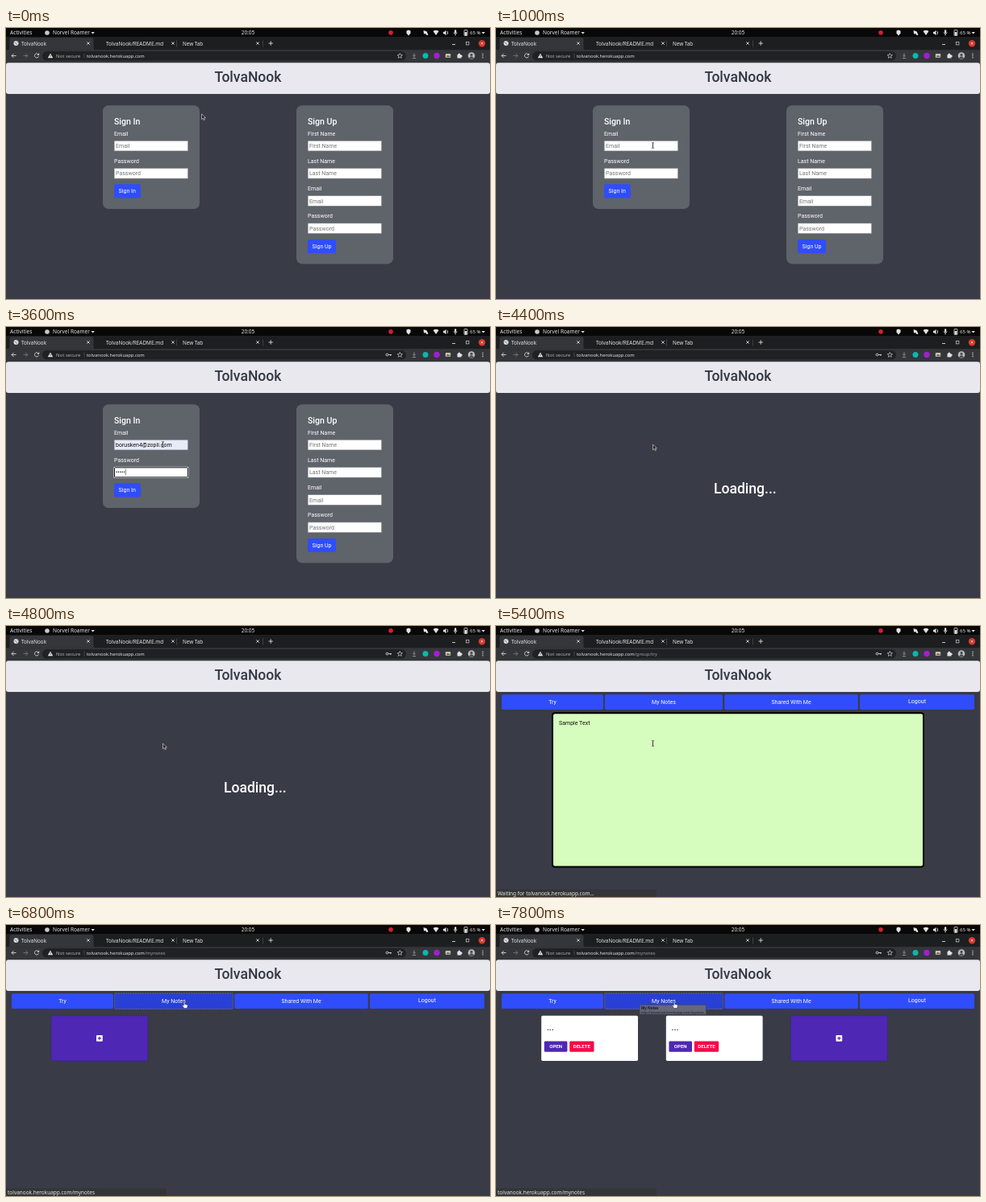
Recreate the animation shown at these times as an HTML page. Size 600 by 337 pixels, loop 8000 ms.

```html
<!DOCTYPE html>
<html lang="en">
<head>
<meta charset="utf-8">
<title>TolvaNook</title>
<style>
  html, body { margin: 0; width: 100%; height: 100%; overflow: hidden; background: #393b47; }
  svg { display: block; width: 100%; height: 100%; }
  text { font: 7.03px Roboto, sans-serif; fill: #fff; white-space: pre; }
  .ui { font-family: "Noto Sans", sans-serif; font-size: 6.3px; fill: #e4e4e4; }
  .title { font-size: 17.55px; font-weight: 500; }
  .line { fill: none; stroke: #d8d8d8; stroke-width: .9; }
</style>
</head>
<body>
<svg id="stage" viewBox="0 0 600 337">
  <g id="browser"></g>
  <g id="page"></g>
</svg>
<script>
const LOOP = 8000, STEP = 200;
const APP = 'TolvaNook', HOST = 'tolvanook.herokuapp.com';
const EMAILS = ['borusken4@zopli.com', 'borusken4@tarvilo.com'];
const BLUE = '#304dfc', PURPLE = '#4e27b5';

const rect = (x, y, w, h, fill, rx = 0, more = '') =>
  `<rect x="${x}" y="${y}" width="${w}" height="${h}" rx="${rx}" fill="${fill}" ${more}/>`;
const text = (x, y, s, style = '', cls = '') =>
  `<text x="${x}" y="${y}" class="${cls}" style="${style}">${s}</text>`;
const ui = (x, y, s, style = '') => text(x, y, s, style, 'ui');
const dot = (x, y, r, fill) => `<circle cx="${x}" cy="${y}" r="${r}" fill="${fill}"/>`;
const line = (d, style = '') => `<path class="line" d="${d}" style="${style}"/>`;
const shape = (d, fill = '#e4e4e4', more = '') => `<path d="${d}" fill="${fill}" ${more}/>`;
const cross = (x, y, r = 1.7) => line(`M${x - r} ${y - r}l${2 * r} ${2 * r}m0 ${-2 * r}l${-2 * r} ${2 * r}`);
const MIDDLE = 'text-anchor:middle;';

function desktopBar() {
  return rect(0, 0, 600, 11.5, '#080808')
    + ui(5, 8.2, 'Activities', 'font-size:6.6px')
    + dot(51, 6, 2.8, '#c8c8c8')
    + ui(58, 8.2, 'Norvel Roamer', 'font-size:6.5px')
    + shape('M105.5 5h4.4l-2.2 2.6z')
    + ui(300, 8.2, '20:05', MIDDLE + 'font-size:6.5px')
    + dot(477, 5.7, 2.8, '#d51f30')
    + shape('M496.500 3.500l2.500 -1 2.500 1v3l-2.500 3 -2.500 -3z')
    + shape('M517.500 3l4 1.200 2 4.300 -2 .5 -1.500 -2 -2 .5z')
    + shape('M529.500 4q3.500 -2.500 7 0l-3.500 5z')
    + shape('M542 4.700h1.500l2 -2v6.600l-2 -2h-1.500z') + line('M547 4q1.500 2 0 4')
    + rect(556, 2.2, 2.2, 4.5, '#e4e4e4', 1.1) + line('M555 5.500q2.100 4 4.200 0M557.100 7.500v2')
    + rect(568, 2.5, 4, 7, 'none', .6, 'stroke="#ddd" stroke-width=".8"') + rect(568.6, 5, 2.8, 4, '#ddd')
    + ui(575, 8.2, '65 %', 'font-size:6px')
    + shape('M589.500 5h4.400l-2.200 2.600z');
}

function tabStrip() {
  return rect(0, 11.5, 600, 16, '#1d1e20')
    + shape('M2 27.500q2.500 0 2.500 -3v-10q0 -2.500 2.500 -2.500h99q2.500 0 2.500 2.500v10q0 3 2.500 3z', '#35363a')
    + dot(12.5, 19, 3, '#e2e2e2') + line('M10.500 18l2 1 1 2M13 16.500l1.500 1.500', 'stroke:#55565a;stroke-width:.7')
    + ui(19, 21.5, APP)
    + ui(124, 21.5, APP + '/README.md', 'font-size:6.4px')
    + ui(219, 21.5, 'New Tab')
    + [102, 207, 312].map(x => cross(x, 19)).join('')
    + line('M211.500 15.500v8M318.500 15.500v8', 'stroke:#55565a;stroke-width:.6')
    + line('M325.500 19h5.400m-2.700 -2.700v5.400M553 20.500h4')
    + rect(570.3, 17.3, 3.6, 3.6, 'none', 0, 'stroke="#ccc" stroke-width=".7"')
    + dot(590, 19.2, 4.2, '#d9372b') + cross(590, 19.2, 1.3);
}

function toolbar() {
  return rect(0, 27.5, 600, 15.5, '#35363a')
    + rect(45, 29, 451, 11.6, '#202124', 5.8)
    + line('M12.500 34.500h-5.500m2.600 -2.600l-2.600 2.600 2.600 2.600')
    + line('M21.500 34.500h5.500m-2.600 -2.600l2.600 2.600 -2.600 2.600', 'stroke:#77787b')
    + line('M40.300 33a2.600 2.600 0 1 0 .2 2.400M40.800 31.500v2h-2')
    + shape('M55 31.500l3.200 5.800h-6.400z') + rect(54.7, 33.6, .7, 2.2, '#202124')
    + ui(62, 36.8, 'Not secure', 'font-size:6px;fill:#aeb1b5')
    + line('M97 31.500v6', 'stroke:#606165;stroke-width:.6')
    + shape('M488.300 31.300l.9 2.200 2.300 .1 -1.800 1.500 .6 2.300 -2 -1.300 -2 1.300 .6 -2.300 -1.800 -1.500 2.300 -.1z', 'none', 'stroke="#ccc" stroke-width=".7"')
    + line('M506 31.500v4m-1.600 -1.500l1.600 1.600 1.600 -1.600M504 37.500h4', 'stroke:#999')
    + dot(520, 34.5, 3.5, '#08b9ae') + dot(534, 34.5, 3.7, '#a11fd0')
    + rect(544.8, 32, 6.4, 5, '#c9c3ad', .8) + shape('M545.500 36.300l2 -2.500 1.500 1.300 1 -.8 1 2z', '#65665f')
    + rect(559.5, 33, 5, 4.5, '#e0e0e0', .6) + dot(561.8, 32.6, 1.2, '#e0e0e0') + dot(564.7, 35, 1.1, '#e0e0e0')
    + dot(577, 34.5, 4.3, '#b9bcc0') + dot(577, 33.4, 1.6, '#4a4b50') + shape('M574 37.500q3 -4.500 6 0q-3 2 -6 0z', '#4a4b50')
    + [32.2, 34.5, 36.8].map(y => dot(591, y, .7, '#ddd')).join('');
}

const address = path => ui(100, 36.8, `${HOST}<tspan fill="#9aa0a6">${path}</tspan>`, 'font-size:5.82px');
const key = () => `<circle cx="472.500" cy="34.500" r="1.400" class="line"/>` + line('M474 34.500h4m-1.200 0v1.500');
const header = () => rect(0, 43.3, 600, 38.7, '#e8e8ee', 3)
  + text(300, 66.7, APP, MIDDLE + 'fill:#353743', 'title');

function field(x, y, label, value = { hint: true }) {
  const focus = value.focus
    ? rect(x - .5, y + 6, 92.8, 14, '#fff', 1.2) + rect(x + .5, y + 7, 90.8, 12, value.fill || '#fff', .6, 'stroke="#101010" stroke-width="1"')
    : rect(x + .2, y + 6.7, 91.3, 12.6, value.fill || '#fff', 0, 'stroke="#85868a" stroke-width=".5"');
  return text(x, y, label) + focus + text(x + 2, y + 15.5, value.hint ? label : value.text,
    `fill:${value.hint ? '#757575' : '#111'};${value.style || ''}`);
}

function card(x, height, heading, fields, buttonWidth) {
  const left = x + 14, bottom = 194.2 + (fields.length - 2) * 34.35;
  return rect(x, 96.2, 120, height, '#5f636a', 7)
    + text(left, 120, heading, 'font-size:10.54px;font-weight:500')
    + fields.map(([label, value], i) => field(left, 133.6 + i * 34.2, label, value)).join('')
    + rect(left, bottom, buttonWidth, 17.2, BLUE, 1.8)
    + text(left + 5.6, bottom + 10.9, heading);
}

function suggestions(highlight) {
  const style = 'font-size:7px;font-weight:600';
  return rect(134, 154.5, 95, 37.7, '#3b3b3c', .8)
    + (highlight ? rect(134, 157, 95, 15.5, '#58595b') : '')
    + ui(139, 167.5, EMAILS[0], style) + ui(139, 183.3, EMAILS[1], style);
}

function signIn(t) {
  const open = t >= 1400 && t < 2600, preview = t >= 1800;
  const email = { focus: t >= 1200 && t < 2800, hint: !preview, text: EMAILS[0] };
  if (preview) email.fill = '#e7ebf8';
  if (preview && open) email.style = 'font-family:"Liberation Sans",sans-serif;font-size:5.85px';
  const dots = Math.min(8, (t - 2600) / STEP);
  const password = dots > 0
    ? { focus: true, text: '•'.repeat(dots) }
    : { hint: true };
  return card(120, 128.8, 'Sign In', [['Email', email], ['Password', password]], 33)
    + (dots > 0 ? rect(136.3 + dots * 2.4, 176.5, .5, 8, '#222') : '')
    + card(360, 197.2, 'Sign Up', ['First Name', 'Last Name', 'Email', 'Password'].map(s => [s]), 35)
    + (open ? suggestions(preview) : '');
}

function navigation(hover, focus) {
  const items = [['Try', 7, 126], ['My Notes', 135, 146], ['Shared With Me', 283.3, 165.5], ['Logout', 451, 142]];
  return items.map(([label, x, w], i) =>
    rect(x, 85.3, w, 18.7, i === 1 && hover ? '#2840d6' : BLUE, 1.8)
    + text(x + w / 2, i === 3 ? 96 : 97, label, MIDDLE)).join('')
    + (focus ? rect(134.6, 84.9, 146.8, 19.6, 'none', 1.5, 'stroke="#6475a8" stroke-width=".8" stroke-dasharray="2 1"') : '');
}

const note = () => rect(70, 108.3, 460, 191.2, '#d6fdbd', 3, 'stroke="#000" stroke-width="2"')
  + text(78, 123.4, 'Sample Text', 'fill:#111');

const smallButton = (x, w, label, fill) => rect(x, 144.4, w, 13.3, fill, 1.3)
  + text(x + w / 2, 153.2, label, MIDDLE + 'font-size:6.05px;font-weight:600');

const noteCard = x => rect(x, 112.8, 119.8, 56.2, '#fff', 1.8)
  + text(x + 6.7, 130.7, '...', 'font-size:10.54px;font-weight:500;fill:#222')
  + smallButton(x + 3.6, 28.6, 'OPEN', PURPLE)
  + smallButton(x + 35, 30.3, 'DELETE', '#f60a48');

const addCard = x => rect(x, 112.8, 119.8, 56.2, PURPLE, 1.8, 'stroke="#36247f" stroke-width=".5"')
  + rect(x + 56, 137, 7.8, 7.8, '#fff', 1)
  + line(`M${x + 57.7} 140.900h4.400m-2.200 -2.200v4.400`, `stroke:${PURPLE};stroke-width:1.100`);

const tooltip = () => rect(178, 99.3, 82.5, 11.7, '#686b77', 1, 'stroke="#3a3d4a" stroke-width=".6" fill-opacity=".93"')
  + ui(180, 104.5, 'My Notes', 'font-size:4.500px;font-weight:700;fill:#151825')
  + ui(180, 109.5, `http://${HOST}/mynotes`, 'font-size:3.950px;fill:#151825');

const status = s => shape('M0 327.500h197q2 0 2 2v7.500h-199z', '#343537')
  + ui(2, 334.5, s, 'font-size:6.450px');

function cursor(kind, x, y) {
  const art = {
    arrow: shape('M0 0v6.800l1.600 -1.400 1.200 2.400 1.100 -.5 -1.100 -2.400h2.100z', '#222', 'stroke="#e8e8e8" stroke-width=".6"'),
    beam: line('M-1.500 -3.500q1.500 0 1.500 1v5q0 1 -1.500 1M1.500 -3.500q-1.500 0 -1.500 1v5q0 1 1.500 1', 'stroke:#333;stroke-width:.8'),
    hand: shape('M-.7 -1.500q.7 -1 1.400 0v2.500l3 .8q.8 .3 .5 1.500l-.7 2.700h-3.700l-2.500 -3.400q.3 -1 1.300 -.3l.7 .6z', '#fff', 'stroke="#222" stroke-width=".5"')
  };
  return `<g transform="translate(${x} ${y})">${art[kind]}</g>`;
}

function ease(t, from, to) {
  const p = Math.min(1, Math.max(0, (t - from) / (to - from)));
  return p * p * (3 - 2 * p);
}

function pointer(t) {
  const toField = ease(t, 0, 1000), toNav = ease(t, 5400, 6400);
  const x = 242.5 - 48 * toField + 26.5 * toNav;
  const y = 106.8 + 39.2 * toField - 48.5 * toNav;
  if (t >= 5400) return cursor(y < 104 ? 'hand' : y > 108 ? 'beam' : 'arrow', x, y);
  const inField = y > 140 && x < 226 && t < 4400;
  return cursor(inField ? 'beam' : 'arrow', x, y);
}

function scene(t) {
  const path = t < 5400 ? '' : t < 6600 ? '/group/try' : '/mynotes';
  let body;
  if (t < 4400) body = signIn(t);
  else if (t < 5400) body = text(270, 206.8, 'Loading...', '', 'title');
  else {
    body = navigation(t >= 6400, t >= 6600);
    if (t < 6600) body += note();
    else if (t < 7200) body += addCard(56);
    else body += noteCard(56.2) + noteCard(210.8) + addCard(365.4);
    if (t < 5800) body += status(`Waiting for ${HOST}…`);
    if (t >= 6400) body += status(HOST + '/mynotes');
    if (t >= 7800) body += tooltip();
  }
  return address(path) + (t >= 2600 ? key() : '') + header() + body + pointer(t);
}

const page = document.getElementById('page');
document.getElementById('browser').innerHTML = desktopBar() + tabStrip() + toolbar();

let shown = -1;
function play() {
  const t = Math.floor(performance.now() % LOOP / STEP) * STEP;
  if (t !== shown) page.innerHTML = scene(shown = t);
  requestAnimationFrame(play);
}
play();
</script>
</body>
</html>
```
